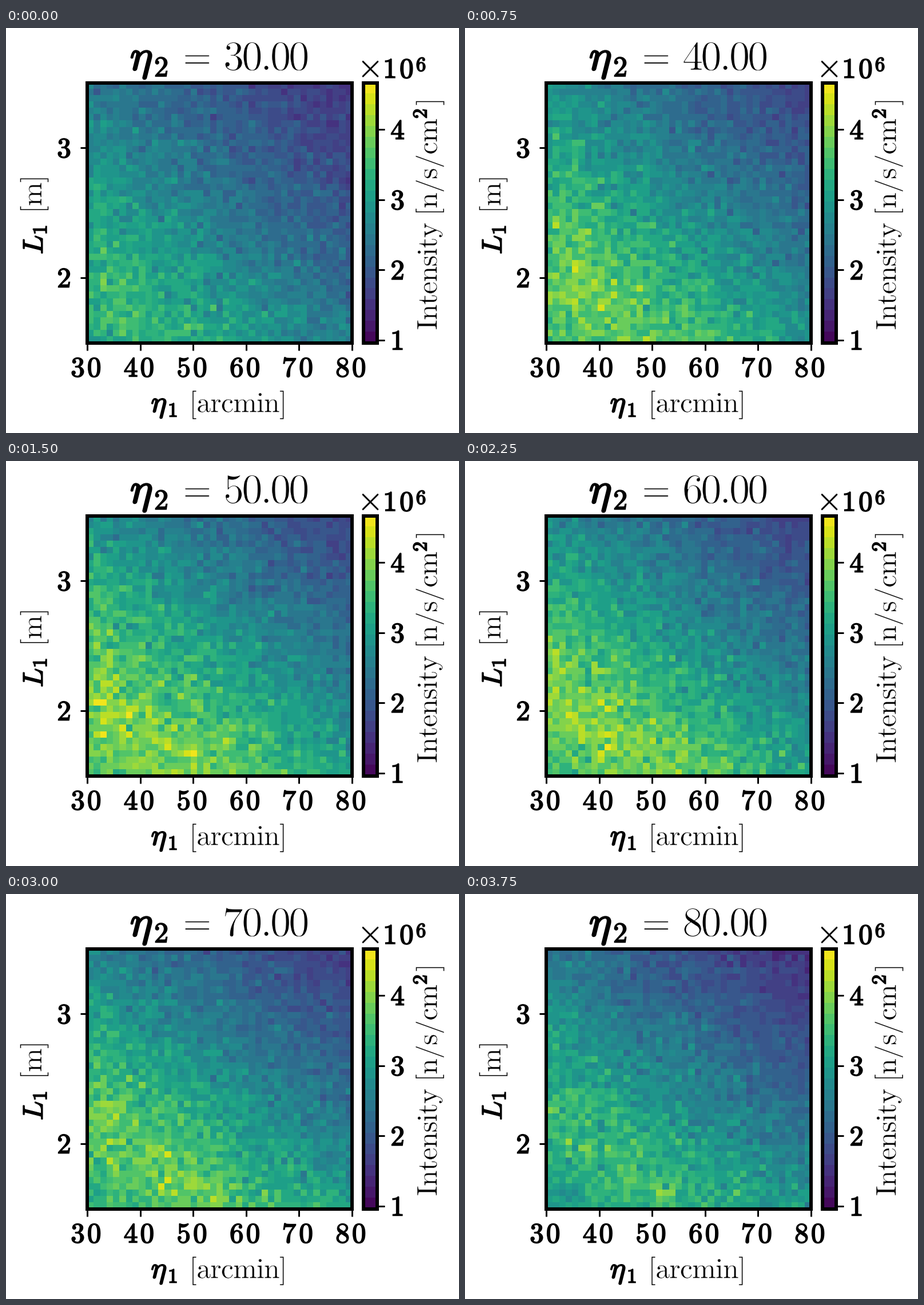
Recreate the animation shown at these times as a matplotlib script. Size 792x707 px, loop 4.5 s.

```python
import numpy as np
import matplotlib.pyplot as plt
from matplotlib.animation import FuncAnimation
from matplotlib.colors import ListedColormap
from matplotlib.patches import PathPatch, Rectangle
from matplotlib.path import Path
from matplotlib.textpath import TextPath
from matplotlib.transforms import Affine2D

plt.rcParams["mathtext.fontset"] = "cm"

W, H, DPI = 792, 707, 100
PX = 72 / DPI
LEFT, RIGHT, TOP, BOTTOM = 142, 605, 96, 549.5
BAR_L, BAR_R = 625, 649
CELLS, STEPS = 41, 6
VMIN, VMAX = 0.963, 4.665
LEVELS = 24
TITLE, LABEL, SUB = 73, 50, 35
BOLD, LIGHT = 1.8, -0.5


def intensity(i):
    """Noisy map that falls off from a ridge near the lower left corner."""
    u, v = np.meshgrid(np.linspace(0, 1, CELLS), np.linspace(0, 1, CELLS))
    x = (30 + 10 * i) / 52
    peak = 3.98 * (x * np.exp(1 - x)) ** 1.3
    ridge = 0.25 + 0.04 * i
    dist = np.hypot(0.95 * u + (0.95 + 0.06 * i) * v - ridge, 0.15) - 0.15
    noise = np.random.default_rng(40 + i).normal(0, 0.07, u.shape)
    return peak * np.exp(-0.52 * dist) * (1 + np.clip(noise, -0.2, 0.2))


def glyphs(s, x, y, size, align=0.0, turn=0):
    """Outline of math text, its ink aligned to x on the baseline y."""
    path = TextPath((0, 0), f"${s}$", size=size)
    box = path.get_extents()
    shift = -(box.x0 + align * box.width)
    place = Affine2D().translate(shift, 0).scale(1, -1).rotate_deg(turn).translate(x, y)
    return place.transform_path(path)


def draw(path, weight=0.0):
    """Fill a path; a positive weight thickens it, a negative one thins it."""
    patch = PathPatch(path, fc="black", ec="black" if weight > 0 else "white",
                      lw=abs(weight) * PX, zorder=5)
    return ax.add_patch(patch)


def put(s, x, y, size, weight=0.0, **kw):
    return draw(glyphs(s, x, y, size, **kw), weight)


def light(s, x, y, **kw):
    text = r"\mathrm{" + r"\hspace{-0.02}".join(s) + "}"
    put(text, x, y, LABEL, LIGHT, **kw)


def bold(s, x, y, size=LABEL - 1):
    """Bold digits centred on x with wide spacing."""
    step = 0.585 * size
    for k, c in enumerate(s):
        put(rf"\mathbf{{{c}}}", x + (k - (len(s) - 1) / 2) * step, y, size, BOLD, align=0.5)


def number(value):
    parts, x = [], 382
    for c in f"{value:.2f}":
        step = 17.5 if c == "." else 32.2
        parts.append(glyphs(rf"\mathrm{{{c}}}", x + step / 2, 73.5, TITLE, align=0.5))
        x += step
    return Path.make_compound_path(*parts)


def tick(x, y):
    ax.plot(x, y, color="black", lw=3 * PX, solid_capstyle="butt", zorder=3)


def frame(x0, x1):
    ax.add_patch(Rectangle((x0, TOP), x1 - x0, BOTTOM - TOP, fill=False, ec="black",
                           lw=6 * PX, joinstyle="miter", zorder=4))


fig = plt.figure(figsize=(W / DPI, H / DPI), dpi=DPI, facecolor="white")
ax = fig.add_axes([0, 0, 1, 1])
mid = (np.arange(LEVELS) + 0.5) / LEVELS
style = dict(origin="lower", aspect="auto", interpolation="nearest",
             cmap=ListedColormap(plt.get_cmap("viridis")(mid)), vmin=VMIN, vmax=VMAX)
heat = ax.imshow(intensity(0), extent=(LEFT, RIGHT, BOTTOM, TOP), **style)
ramp = VMIN + mid * (VMAX - VMIN)
ax.imshow(ramp[:, None], extent=(BAR_L, BAR_R, BOTTOM, TOP), **style)
ax.set(xlim=(0, W), ylim=(H, 0))
ax.axis("off")
frame(LEFT, RIGHT)
frame(BAR_L, BAR_R)

for v in range(30, 90, 10):
    x = LEFT + (v - 30) / 50 * (RIGHT - LEFT)
    tick([x, x], [BOTTOM, 562.5])
    bold(str(v), x - 2.2, 608.5)
for v in (2, 3):
    y = BOTTOM - (v - 1.5) / 2 * (BOTTOM - TOP)
    tick([129.5, LEFT], [y, y])
    bold(str(v), 101.5, y + 16.5)
for v in range(1, 5):
    y = BOTTOM - (v - VMIN) / (VMAX - VMIN) * (BOTTOM - TOP)
    tick([BAR_R, 661.5], [y, y])
    bold(str(v), 684.5, y + 16.5)

# Colour bar multiplier
put(r"\times", 623, 86.5, 58, 0.6)
bold("10", 686, 87)
bold("6", 725.5, 75, SUB)

# Title
put(r"\eta", 219, 73.5, 75, 2.8)
bold("2", 271.5, 84.5, LABEL)
put("=", 313, 71, 64, -0.8)
value = draw(number(30), -1.2)

# Axis labels
put(r"\eta", 255, 670.5, 52, 2.2)
bold("1", 292, 678.5, SUB)
light("[arcmin]", 326, 670.5)

up = dict(turn=-90)
put("L", 64, 393, LABEL - 1, BOLD, **up)
put(r"\mathbf{1}", 71, 358, SUB, BOLD, **up)
light("[m]", 62, 318, **up)

light("Intensity", 753.5, 526, **up)
light("[n/s/cm", 753.5, 322, **up)
put(r"\mathbf{2}", 735.5, 156.5, SUB, BOLD, **up)
light("]", 753.5, 134, **up)


def update(i):
    heat.set_data(intensity(i))
    value.set_path(number(30 + 10 * i))
    return heat, value


anim = FuncAnimation(fig, update, frames=STEPS, interval=750,
                     repeat=True, repeat_delay=0, blit=False)
plt.show()
```
